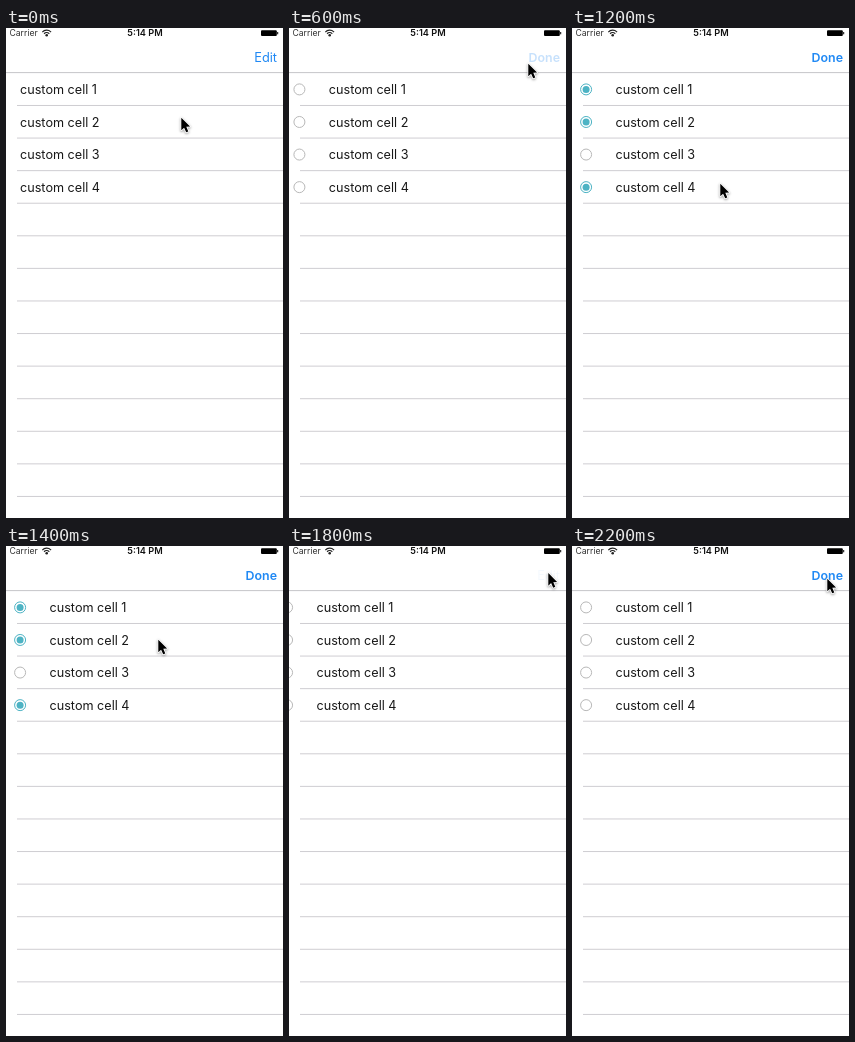
Animation of 277 by 490 pixels, one loop 2400 ms. Source, as an HTML page with a canvas:

```html
<!DOCTYPE html>
<html lang="en">
<head>
<meta charset="utf-8">
<title>Editable list</title>
<style>
  html, body { margin: 0; width: 100%; height: 100%; overflow: hidden; background: #fff; }
  canvas { display: block; width: 277px; height: 490px; }
</style>
</head>
<body>
<canvas id="stage"></canvas>
<script>
const W = 277, H = 490, LOOP = 2400, STEP = 100;
const ROW = 32.58, BAR = 44.4, INDENT = 29.5, SLIDE = 200;
const FONT = 'Inter, Roboto, sans-serif';
const BLUE = '#2089f4', TEAL = '#4db3c4', GRAY = '#b8b8b8';

// Each tap on the bar button toggles edit mode
const taps = [500, 1754, 2000];
const checkTimes = [800, 900, Infinity, 1200];

// Pointer stops: time, x, y
const stops = [
  [0, 175, 89], [300, 215, 56], [500, 258, 32], [600, 239, 35], [900, 150, 89],
  [1200, 148, 155], [1400, 152, 93], [1700, 260, 25], [2200, 255, 32]
];

const canvas = document.getElementById('stage');
const ctx = canvas.getContext('2d');
const dpr = window.devicePixelRatio || 1;
canvas.width = W * dpr;
canvas.height = H * dpr;

const lerp = (a, b, p) => a + (b - a) * p;
const easeOut = p => 1 - (1 - p) ** 3;

function pointerAt(t) {
  const i = stops.findIndex(s => s[0] > t);
  if (i < 0) return stops[stops.length - 1].slice(1);
  const [t0, x0, y0] = stops[i - 1], [t1, x1, y1] = stops[i];
  const p = (t - t0) / (t1 - t0);
  return [lerp(x0, x1, p), lerp(y0, y1, p)];
}

function modeAt(t) {
  const past = taps.filter(tap => tap < t);
  const editing = past.length % 2 === 1;
  const p = past.length ? Math.min(1, (t - past[past.length - 1]) / SLIDE) : 1;
  const open = editing ? easeOut(p) : 1 - easeOut(p);
  return { editing, shift: INDENT * open, fade: p * p };
}

function text(str, x, y, size, color, weight = 400, align = 'left') {
  ctx.font = `${weight} ${size}px ${FONT}`;
  ctx.textAlign = align;
  ctx.fillStyle = color;
  ctx.fillText(str, x, y);
}

function hline(x, y, color) {
  ctx.fillStyle = color;
  ctx.fillRect(x, y, W - x, 1);
}

function disc(x, y, r, color) {
  ctx.beginPath();
  ctx.arc(x, y, r, 0, Math.PI * 2);
  ctx.fillStyle = color;
  ctx.fill();
}

function drawStatus() {
  text('Carrier', 3.4, 8.4, 8.7, '#333');
  text('5:14 PM', 139, 8.4, 9.2, '#111', 600, 'center');

  ctx.strokeStyle = '#222';
  ctx.lineWidth = 1.2;
  for (const r of [3.6, 6]) {
    ctx.beginPath();
    ctx.arc(40.7, 8.2, r, -Math.PI * 0.76, -Math.PI * 0.24);
    ctx.stroke();
  }
  disc(40.7, 7.2, 1.3, '#222');

  ctx.fillStyle = '#000';
  ctx.beginPath();
  ctx.roundRect(255, 2.2, 15.8, 5.9, 1);
  ctx.fill();
  ctx.fillRect(271.2, 4, 1, 2.3);
}

function drawButton({ editing, fade }) {
  ctx.globalAlpha = fade;
  if (editing) text('Done', 271, 33.5, 12.4, BLUE, 600, 'right');
  else text('Edit', 271, 33.5, 12.8, BLUE, 400, 'right');
  ctx.globalAlpha = 1;
}

function drawRadio(x, y, on) {
  ctx.beginPath();
  ctx.arc(x, y, 5.5, 0, Math.PI * 2);
  ctx.strokeStyle = on ? TEAL : GRAY;
  ctx.lineWidth = 1;
  ctx.stroke();
  if (on) disc(x, y, 3.5, TEAL);
}

function drawRows(t, { editing, shift }) {
  for (let y = BAR + ROW; y < H; y += ROW) hline(11, y, '#cfced2');
  checkTimes.forEach((at, i) => {
    const y = 61.4 + i * ROW;
    if (shift > 0) drawRadio(shift - 15.4, y, editing && t >= at && t < taps[1]);
    text(`custom cell ${i + 1}`, 14 + shift, y + 4.6, 12.65, '#181818');
  });
}

function drawPointer(t) {
  const [x, y] = pointerAt(t);
  const shape = [[0, 0], [0, 12.6], [2.8, 10], [4.9, 14.6], [7, 13.7], [5, 9.1], [8.8, 8.9]];
  ctx.save();
  ctx.translate(x + 0.3, y + 0.7);
  ctx.beginPath();
  shape.forEach(([px, py]) => ctx.lineTo(px, py));
  ctx.closePath();
  ctx.lineJoin = 'round';
  ctx.lineWidth = 1.6;
  ctx.strokeStyle = '#fff';
  ctx.shadowColor = 'rgba(0,0,0,0.4)';
  ctx.shadowBlur = 2.5 * dpr;
  ctx.shadowOffsetY = dpr;
  ctx.stroke();
  ctx.shadowColor = 'transparent';
  ctx.fillStyle = '#000';
  ctx.fill();
  ctx.restore();
}

function draw(t) {
  const mode = modeAt(t);
  ctx.setTransform(dpr, 0, 0, dpr, 0, 0);
  ctx.fillStyle = '#fff';
  ctx.fillRect(0, 0, W, H);
  hline(0, BAR - 0.3, '#c6c6c9');
  drawStatus();
  drawRows(t, mode);
  drawButton(mode);
  drawPointer(t);
}

const start = performance.now();
function tick() {
  const t = (performance.now() - start) % LOOP;
  // The last picture of the loop holds for two steps
  draw(Math.min(Math.floor(t / STEP) * STEP, LOOP - 2 * STEP));
  requestAnimationFrame(tick);
}
tick();
</script>
</body>
</html>
```
